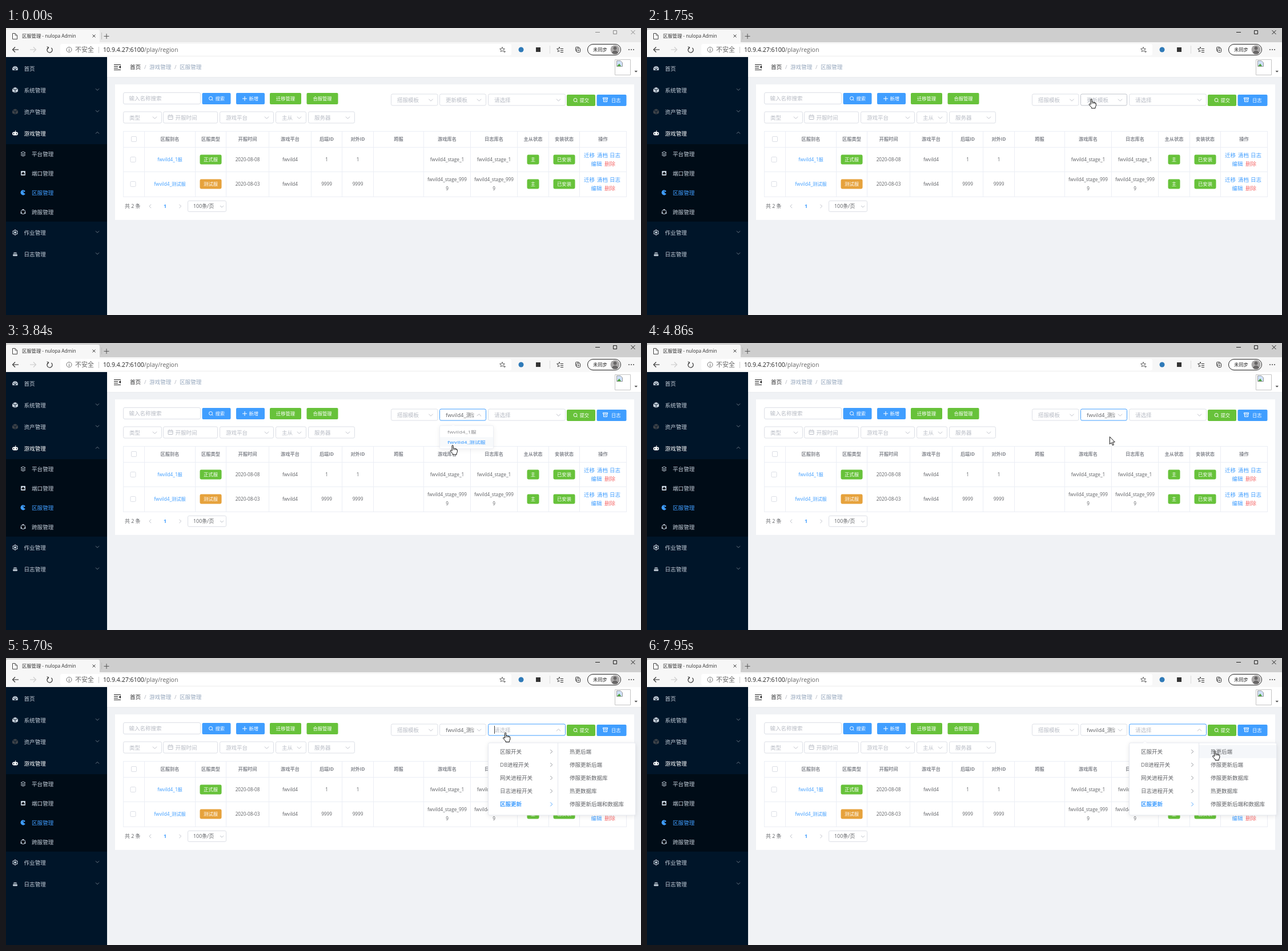
Recreate the animation shown at these times as an HTML page with a canvas. Size 1112 by 504 pixels, loop 8000 ms.

```html
<!DOCTYPE html>
<html lang="zh-CN">
<head>
<meta charset="utf-8">
<style>
html, body { margin: 0; width: 100%; height: 100%; overflow: hidden; background: #f0f2f5; }
canvas { display: block; }
</style>
</head>
<body>
<canvas id="stage" width="1112" height="504"></canvas>
<script>
const ctx = document.getElementById('stage').getContext('2d');
const LOOP = 8000;
const FONT = '"Open Sans", "Noto Sans CJK SC", sans-serif';
const BLUE = '#409eff', GREEN = '#67c23a', ORANGE = '#e6a23c', RED = '#f56c6c';
const TEXT = '#606266', HINT = '#b8bcc5', LINE = '#ebeef5', EDGE = '#dcdfe6', HOVER = '#f5f7fa';
const GAME = 'fwvild4';
const SERVERS = [GAME + '_1服', GAME + '_测试服'];

// Moments of the story, in ms
const FOCUS = 1700, OPEN = 1830, PICK = 3823, CASCADE = 5424;

function bezier(x1, y1, x2, y2) {
  const at = (a, b, s) => 3 * a * s * (1 - s) ** 2 + 3 * b * s * s * (1 - s) + s ** 3;
  return x => {
    if (x <= 0) return 0;
    if (x >= 1) return 1;
    let lo = 0, hi = 1;
    for (let i = 0; i < 24; i++) {
      const mid = (lo + hi) / 2;
      if (at(x1, x2, mid) < x) lo = mid; else hi = mid;
    }
    return at(y1, y2, lo);
  };
}
const zoomEase = bezier(.23, 1, .32, 1), ease = bezier(.25, .1, .25, 1), moveEase = bezier(.4, 0, .5, 1);
const zoom = (t, start) => zoomEase((t - start) / 300);
const turn = (t, start) => ease((t - start) / 300);

function text(s, x, y, size = 9.5, color = TEXT, align = 'left', weight = 400) {
  ctx.font = `${weight} ${size}px ${FONT}`;
  ctx.textAlign = align;
  ctx.fillStyle = color;
  ctx.fillText(s, x, y + size * .37);
}
function rect(x, y, w, h, color) {
  ctx.fillStyle = color;
  ctx.fillRect(x, y, w, h);
}
function box(x, y, w, h, r, fill, stroke) {
  ctx.beginPath();
  ctx.roundRect(x, y, w, h, r);
  if (fill) { ctx.fillStyle = fill; ctx.fill(); }
  if (stroke) { ctx.strokeStyle = stroke; ctx.lineWidth = 1; ctx.stroke(); }
}
function path(points, color, width = 1, close = false, fill) {
  ctx.beginPath();
  for (let i = 0; i < points.length; i += 2) ctx.lineTo(points[i], points[i + 1]);
  if (close) ctx.closePath();
  if (fill) { ctx.fillStyle = fill; ctx.fill(); }
  if (color) { ctx.strokeStyle = color; ctx.lineWidth = width; ctx.stroke(); }
}
function ring(x, y, r, color, width = 1, from = 0, to = Math.PI * 2) {
  ctx.beginPath();
  ctx.arc(x, y, r, from, to);
  ctx.strokeStyle = color;
  ctx.lineWidth = width;
  ctx.stroke();
}
function dot(x, y, r, color) {
  ctx.beginPath();
  ctx.arc(x, y, r, 0, Math.PI * 2);
  ctx.fillStyle = color;
  ctx.fill();
}
function at(x, y, draw, angle = 0) {
  ctx.save();
  ctx.translate(x, y);
  ctx.rotate(angle);
  draw();
  ctx.restore();
}
// Downward chevron, turned by angle
function chevron(x, y, color = HINT, angle = 0, w = 3.6) {
  at(x, y, () => path([-w, -w / 2, 0, w / 2, w, -w / 2], color, .9), angle);
}
const RIGHT = -Math.PI / 2, LEFT = Math.PI / 2;

function star(x, y, color) {
  const p = [];
  for (let i = 0; i < 10; i++) {
    const r = i % 2 ? 2 : 4.6, a = i * Math.PI / 5 - Math.PI / 2;
    p.push(x + r * Math.cos(a), y + r * Math.sin(a));
  }
  path(p, color, .9, true);
}
function lens(x, y, color = '#fff') {
  ring(x, y, 3, color);
  path([x + 2.1, y + 2.1, x + 3.9, y + 3.9], color);
}

function browser(t) {
  const active = t >= FOCUS, ink = active ? '#222' : '#8a8a8a', dark = '#333';
  rect(0, 0, 1112, 25, active ? '#cecece' : '#e8e8e8');
  box(0, 3, 164, 26, [3, 3, 0, 0], '#f7f7f7');
  rect(0, 25, 1112, 26, '#f7f7f7');
  path([11.5, 9.5, 16, 9.5, 19.5, 13, 19.5, 19.5, 11.5, 19.5], '#444', 1, true, '#fff');
  path([16, 9.5, 16, 13, 19.5, 13], '#444', .8);
  text('区服管理 - nulopa Admin', 28, 14, 8.3, '#333');
  path([151.5, 11.5, 156.5, 16.5], '#444');
  path([156.5, 11.5, 151.5, 16.5], '#444');
  rect(167, 8, 1, 12, '#bbb');
  path([171.5, 14.5, 180.5, 14.5], '#555');
  path([176, 10, 176, 19], '#555');
  path([1032, 7.5, 1040, 7.5], ink);
  box(1063.5, 4.5, 6, 6, 0, null, ink);
  path([1094.5, 4, 1101.5, 11], ink);
  path([1101.5, 4, 1094.5, 11], ink);

  for (const [x, s, c] of [[17, 1, dark], [47, -1, '#ccc']])
    at(x, 38, () => {
      path([-5 * s, 0, 5 * s, 0], c, 1.1);
      path([-s, -4.5, -5.5 * s, 0, -s, 4.5], c, 1.1);
    });
  ring(76.5, 38.5, 4.6, dark, 1.2, -.9, 4.3);
  path([71.5, 33, 75, 34, 73, 37], dark, 1);
  box(95, 28, 790, 20, 3, '#fff');
  ring(110.5, 38, 4.5, '#666', .9);
  rect(110, 37, 1, 4, '#666');
  rect(110, 35, 1, 1, '#666');
  text('不安全', 121, 38, 11, '#666');
  rect(162, 33, 1, 11, '#ccc');
  text('10.9.4.27:6100', 170, 38, 10.6, '#222');
  text('/play/region', 170 + ctx.measureText('10.9.4.27:6100').width, 38, 10.6, '#666');
  star(869, 38, '#555');
  dot(873, 41.5, 2.2, '#fff');
  path([871, 41.5, 875, 41.5], '#555', .8);
  path([873, 39.5, 873, 43.5], '#555', .8);
  dot(902, 38, 4.5, '#2f7ab8');
  rect(928, 34, 8, 8, '#333');
  rect(952, 31, 1, 14, '#ddd');
  star(969, 38, '#333');
  rect(970, 36, 6, 7, '#f7f7f7');
  for (let y = 36.5; y < 43; y += 3) path([971, y, 976, y], '#333');
  box(997.5, 33.5, 6, 7, 1, null, '#333');
  box(999.5, 35.5, 6, 7, 1, '#f7f7f7', '#333');
  path([1001, 39, 1004, 39], '#333', .8);
  path([1002.5, 37.5, 1002.5, 40.5], '#333', .8);
  box(1018.5, 28.5, 58, 19, 9.5, '#fff', '#222');
  text('未同步', 1028, 38, 8.3, '#222');
  dot(1066.5, 38, 8, '#aaa8a8');
  ctx.save();
  ctx.beginPath();
  ctx.arc(1066.5, 38, 8, 0, 7);
  ctx.clip();
  dot(1066.5, 35.5, 3, '#686666');
  dot(1066.5, 45, 5.5, '#686666');
  ctx.restore();
  for (const x of [1091, 1095, 1099]) dot(x, 38, .9, '#333');
}

const MENU_ICONS = {
  gauge(c) {
    ctx.beginPath(); ctx.arc(0, 1, 5, Math.PI * .85, Math.PI * 2.15); ctx.closePath();
    ctx.fillStyle = c; ctx.fill();
    dot(0, 1.5, 1.2, '#001529'); dot(-2.6, 0, .7, '#001529'); dot(2.6, 0, .7, '#001529'); dot(0, -2, .7, '#001529');
  },
  cube(c) {
    path([0, -5, 5, -2.6, 5, 2.6, 0, 5, -5, 2.6, -5, -2.6], null, 1, true, c);
    path([-5, -2.6, 0, -.5, 5, -2.6], '#001529', .9);
    path([0, -.5, 0, 5], '#001529', .9);
  },
  pad(c) {
    box(-5, -2.5, 10, 6, 3, c);
    path([0, -2, 1, -5], c);
    dot(-2.5, .5, 1, '#001529'); dot(2.5, .5, 1, '#001529');
  },
  layers(c) {
    path([0, -4, 4, -2, 0, 0, -4, -2], c, .9, true);
    path([-4, .3, 0, 2.3, 4, .3], c, .9);
    path([-4, 2.3, 0, 4.3, 4, 2.3], c, .9);
  },
  port(c) {
    box(-4, -4, 8, 8, 1, c);
    path([-2.5, 2, -2.5, -.5, -1, -.5, -1, -2, 1, -2, 1, -.5, 2.5, -.5, 2.5, 2], null, 1, true, '#000c17');
  },
  pie(c) {
    ctx.beginPath(); ctx.moveTo(0, 0); ctx.arc(0, 0, 4.5, .55, Math.PI * 2 - .55); ctx.closePath();
    ctx.fillStyle = c; ctx.fill();
    dot(.2, -2.3, .8, '#000c17');
  },
  loop(c) {
    ring(0, 0, 3.8, c, 1);
    for (let i = 0; i < 3; i++) {
      const a = i * Math.PI * 2 / 3 - Math.PI / 2;
      dot(3.8 * Math.cos(a), 3.8 * Math.sin(a), 1.3, c);
    }
  },
  gear(c) {
    ring(0, 0, 4, c, 1);
    for (let i = 0; i < 6; i++) dot(4.3 * Math.cos(i * Math.PI / 3 + .52), 4.3 * Math.sin(i * Math.PI / 3 + .52), .9, c);
    dot(0, 0, 2, c);
  },
  stack(c) {
    rect(-2.5, -3, 5, 1, c);
    rect(-3.2, -1.3, 6.4, 1, c);
    box(-4, .4, 8, 3, .8, c);
  }
};

function sidebar() {
  rect(0, 51, 177, 453, '#001529');
  rect(0, 204, 177, 136, '#000c17');
  const soft = '#c3cdd8';
  const top = [['首页', 71, 'gauge'], ['系统管理', 109, 'cube'], ['资产管理', 147, 'cube', '#3d4248'],
    ['游戏管理', 185, 'pad'], ['作业管理', 359, 'gear'], ['日志管理', 397, 'stack']];
  for (const [label, y, icon, tint] of top) {
    const open = icon === 'pad', color = open ? '#fff' : soft;
    at(16, y, () => MENU_ICONS[icon](tint || color));
    text(label, 31.5, y, 9.6, color, 'left', open ? 500 : 400);
    if (icon !== 'gauge') chevron(160, y - 1, '#77838f', open ? Math.PI : 0, 3);
  }
  [['平台管理', 'layers'], ['端口管理', 'port'], ['区服管理', 'pie'], ['跨服管理', 'loop']].forEach(([label, icon], i) => {
    const y = 221 + i * 34, color = i === 2 ? BLUE : soft;
    at(30, y, () => MENU_ICONS[icon](color));
    text(label, 45, y, 9.6, color);
  });
}

function header() {
  rect(177, 51, 935, 453, '#f0f2f5');
  rect(177, 51, 935, 35, '#fff');
  rect(177, 86, 935, 1, '#e9ebee');
  for (const y of [64, 67, 70, 73])
    rect(189, y, y === 64 || y === 73 ? 12 : 7, 1, '#222');
  path([201, 65.8, 201, 71.2, 197.5, 68.5], null, 1, true, '#222');
  text('首页', 217, 68.5, 9.6, '#303133');
  text('/', 242, 68.5, 9.6, '#b0b5be');
  text('游戏管理', 251, 68.5, 9.6, '#97a8be');
  text('/', 295, 68.5, 9.6, '#b0b5be');
  text('区服管理', 304, 68.5, 9.6, '#97a8be');
  box(1066.5, 55.5, 27, 27, 0, '#fff', '#c4c4c4');
  path([1069.5, 57.5, 1076, 57.5, 1079.5, 61, 1079.5, 67.5, 1069.5, 67.5], '#9a9a9a', 1, true, '#cfe0f7');
  path([1070, 67, 1074, 62.5, 1077, 67], null, 1, true, '#4da33c');
  path([1100.5, 75, 1106, 75, 1103.2, 78], null, 1, true, '#555');
}

const SELECTS = {
  kit: [674.5, 116, 81.5], patch: [759.5, 116, 81], action: [844.5, 116, 135]
};
function select([x, y, w], label, { edge = EDGE, ink = HINT, angle = 0, icon } = {}) {
  box(x, y, w, 20, 2.5, '#fff', edge);
  ctx.save();
  ctx.beginPath();
  ctx.rect(x, y, w - 21, 20);
  ctx.clip();
  text(label, x + (icon ? 21 : 10.5), y + 10.3, 9.5, ink);
  ctx.restore();
  if (icon) {
    box(x + 8.5, y + 6.5, 8, 7, .5, null, HINT);
    path([x + 8.5, y + 9, x + 16.5, y + 9], HINT);
    path([x + 10.5, y + 5, x + 10.5, y + 7], HINT);
    path([x + 14.5, y + 5, x + 14.5, y + 7], HINT);
  } else chevron(x + w - 12, y + 10.5, HINT, angle);
}
function button(x, y, w, label, color, tx = x + w / 2, align = 'center') {
  box(x, y, w, 20, 2, color);
  text(label, tx, y + 10, 8.3, '#fff', align, 500);
}
function tag(x, y, w, label, color) {
  box(x - .5, y - 8.5, w + 1, 17, 2.4, color);
  text(label, x + w / 2, y, 8.3, '#fff', 'center', 500);
}

const inside = ([x, y, w], p) => p && p.x >= x && p.x <= x + w && p.y >= y && p.y <= y + 20;

function filters(t, p) {
  rect(191, 99, 909, 238, '#fff');
  box(205.5, 113.5, 135, 20, 2.5, '#fff', EDGE);
  text('输入名称搜索', 215.5, 123.8, 9.5, HINT);
  button(343.5, 114, 50, '搜索', BLUE, 366.5, 'left');
  lens(358.5, 123.5);
  button(403, 114, 50, '新增', BLUE, 425.5, 'left');
  path([414, 124, 422, 124], '#fff');
  path([418, 120, 418, 128], '#fff');
  button(462, 114, 55, '迁移管理', GREEN);
  button(526.5, 114, 55, '合服管理', GREEN);
  select([205.5, 147, 67], '类型');
  select([275.5, 147, 95], '开服时间', { icon: true });
  select([374.5, 147, 94], '游戏平台');
  select([472.5, 147, 53], '主从');
  select([529.5, 147, 81], '服务器');

  const edge = (name, from, to) =>
    t >= from && t < to ? BLUE : inside(SELECTS[name], p) ? '#c0c4cc' : EDGE;
  const picked = t >= PICK - 30;
  select(SELECTS.kit, '搭服模板', { edge: edge('kit', 0, 0) });
  select(SELECTS.patch, picked ? SERVERS[1] : '更新模板', {
    edge: edge('patch', OPEN, CASCADE - 30),
    ink: picked ? TEXT : HINT,
    angle: -Math.PI * (turn(t, OPEN) - turn(t, PICK))
  });
  select(SELECTS.action, '请选择', {
    edge: edge('action', CASCADE - 30, LOOP),
    angle: Math.PI * turn(t, CASCADE)
  });
  const caret = t >= CASCADE - 30 && t < 5870 || t >= 6330 && t < 6940 || t >= 7450 && t < 7950;
  if (caret) rect(855, 119, 1, 14, '#444');
  button(982, 117, 50, '提交', GREEN, 1004.5, 'left');
  lens(997, 126.5);
  button(1034.5, 117, 52, '日志', BLUE, 1060, 'left');
  box(1045.5, 122.5, 8, 2, 0, null, '#fff');
  box(1046.5, 124.5, 6, 5, 0, null, '#fff');
  path([1048, 127, 1051, 127], '#fff');
}

const EDGES = [205, 242, 331, 385, 460, 534, 588, 643, 731, 813, 895, 950, 1004, 1086];
const HEADS = ['', '区服别名', '区服类型', '开服时间', '游戏平台', '后端ID', '对外ID', '跨服', '游戏库名', '日志库名', '主从状态', '安装状态', '操作'];
const mid = i => (EDGES[i] + EDGES[i + 1]) / 2 + .5;

function row(y, id, kind, color, date, name) {
  const cell = (i, s, dy = 0, ink = TEXT) => text(s, mid(i), y + dy, 8.2, ink, 'center');
  box(218, y - 4.5, 9, 9, 1.5, '#fff', EDGE);
  cell(1, name, 0, BLUE);
  tag(340, y, 37, kind, color);
  cell(3, date);
  cell(4, GAME);
  cell(5, id);
  cell(6, id);
  for (const i of [8, 9]) {
    const db = GAME + '_stage_' + id;
    if (id.length === 1) cell(i, db);
    else {
      cell(i, db.slice(0, -1), -8);
      cell(i, db.slice(-1), 8);
    }
  }
  tag(913, y, 20, '主', GREEN);
  tag(959, y, 37, '已安装', GREEN);
  [['迁移', 1012], ['清档', 1035], ['日志', 1057]].forEach(([s, x]) => text(s, x, y - 7.5, 9.5, BLUE));
  text('编辑', 1024.5, y + 7.8, 9.5, BLUE);
  text('删除', 1048, y + 7.8, 9.5, RED);
}

function table(p, covered) {
  if (p && !covered && p.x > 205 && p.x < 1086)
    for (const y of [209, 253])
      if (p.y >= y && p.y < y + 44) rect(205, y, 881, 44, HOVER);
  for (const x of EDGES) rect(x, 181, 1, 116, LINE);
  for (const y of [181, 209, 252, 296]) rect(205, y, 882, 1, LINE);
  box(219.5, 190.5, 9, 9, 1.5, '#fff', EDGE);
  HEADS.forEach((s, i) => text(s, mid(i), 195, 8.2, '#85888f', 'center', 700));
  row(231, '1', '正式服', GREEN, '2020-08-08', SERVERS[0]);
  row(274, '9999', '测试服', ORANGE, '2020-08-03', SERVERS[1]);
  text('共 2 条', 208, 313, 8.9, TEXT);
  chevron(252.5, 313, HINT, LEFT, 3.2);
  text('1', 278.5, 313, 8.9, BLUE, 'center', 700);
  chevron(305, 313, HINT, RIGHT, 3.2);
  box(318.5, 303.5, 67, 19, 2.2, '#fff', EDGE);
  text('100条/页', 328, 313, 8.9, TEXT);
  chevron(378, 313.5, HINT, 0, 3);
}

// White panel that unfolds from its top edge; its shadow stays outside the panel
function popup(x, y, w, h, tip, amount, draw) {
  if (amount <= 0) return;
  ctx.save();
  ctx.globalAlpha = amount;
  ctx.translate(0, y);
  ctx.scale(1, amount);
  ctx.translate(0, -y);
  ctx.save();
  ctx.beginPath();
  ctx.rect(x - 20, y - 20, w + 40, h + 40);
  ctx.roundRect(x, y, w, h, 2.5);
  ctx.clip('evenodd');
  ctx.shadowColor = 'rgba(0,0,0,.1)';
  ctx.shadowBlur = 8;
  ctx.shadowOffsetY = 1.4;
  box(x, y, w, h, 2.5, '#fff');
  ctx.restore();
  box(x, y, w, h, 2.5, '#fff', '#e6e9f0');
  path([tip - 4, y + .6, tip, y - 3.5, tip + 4, y + .6], '#ebeef5', .8, false, '#fff');
  draw();
  ctx.restore();
}

function serverList(t, p) {
  const amount = zoom(t, OPEN) - zoom(t, PICK);
  const picked = t >= PICK - 30, w = picked ? 94 : 91;
  popup(759.5, 145, w, 54, 783, amount, () => {
    const hot = t > 2910 && p.y > 148 && p.y < 172 ? 0 : 1;
    rect(760, 149 + hot * 23, w - 1, 23, HOVER);
    SERVERS.forEach((s, i) => {
      const on = picked && i === 1;
      text(s, 773, 160.3 + i * 23.2, 9.5, on ? BLUE : TEXT, 'left', on ? 700 : 400);
    });
  });
}

const ACTIONS = ['区服开关', 'DB进程开关', '网关进程开关', '日志进程开关', '区服更新'];
const UPDATES = ['热更后端', '停服更新后端', '停服更新数据库', '热更数据库', '停服更新后端和数据库'];

function cascader(t, p) {
  popup(844.5, 149, 258, 127, 872, zoom(t, CASCADE), () => {
    rect(966, 149, 1, 127, '#e4e7ed');
    for (let i = 0; i < 5; i++) {
      const y = 164.3 + i * 23.15, on = i === 4;
      if (p.y > y - 11.5 && p.y < y + 11.5) {
        if (p.x > 967) rect(967, y - 11.5, 135, 23, HOVER);
        else if (p.x > 844) rect(845, y - 11.5, 121, 23, HOVER);
      }
      text(ACTIONS[i], 865, y, 9.5, on ? BLUE : TEXT, 'left', on ? 700 : 400);
      chevron(955, y, on ? BLUE : '#85888f', RIGHT, 3.4);
      text(UPDATES[i], 987, y, 9.5, TEXT);
    }
  });
}

// Moves: start, end, then the place of the pointer tip at the end
const MOVES = [[740, 1360, 778, 124.5], [2910, 3380, 782, 179.5], [4620, 5300, 874.5, 131], [6940, 7660, 994.5, 163]];
function pointer(t) {
  if (t < 740) return null;
  let x = 690, y = 377;
  for (const [from, to, nx, ny] of MOVES) {
    const k = moveEase((t - from) / (to - from));
    x += (nx - x) * k;
    y += (ny - y) * k;
  }
  return { x, y };
}
function cursor(p, hand) {
  if (!p) return;
  at(p.x, p.y, () => {
    ctx.lineJoin = 'round';
    if (hand) {
      path([-1, .8, 0, 0, 1.2, .8, 1.2, 5.5, 3.3, 5.4, 4, 6.2, 6, 6.2, 6.5, 7.2, 8, 7.4, 8.3, 8.5,
        8.3, 12, 7, 14.5, 7, 16.5, .5, 16.5, .5, 15, -3.8, 10.2, -3.6, 8.8, -2.2, 8.8, -1, 10], '#111', 1, true, '#fff');
      for (const x of [1.3, 3.7, 6.1]) path([x, 6, x, 8.6], '#111', .8);
    } else
      path([0, 0, 0, 13, 3, 10.3, 5, 15, 7, 14.2, 5, 9.5, 9, 9.3], '#111', 1, true, '#fff');
    ctx.lineJoin = 'miter';
  });
}

function frame(now) {
  const t = now % LOOP, p = pointer(t);
  const list = t >= OPEN && t < PICK + 300, panel = t >= CASCADE;
  header();
  sidebar();
  browser(t);
  filters(t, p);
  table(p, list || panel);
  serverList(t, p);
  cascader(t, p);
  const overList = list && p.y > 145 && p.y < 199;
  const overPanel = panel && p.y > 149 && p.x > 844;
  cursor(p, overList || overPanel || Object.values(SELECTS).some(s => inside(s, p)));
  requestAnimationFrame(frame);
}
const begin = performance.now();
requestAnimationFrame(now => frame(Math.max(0, now - begin)));
</script>
</body>
</html>
```
